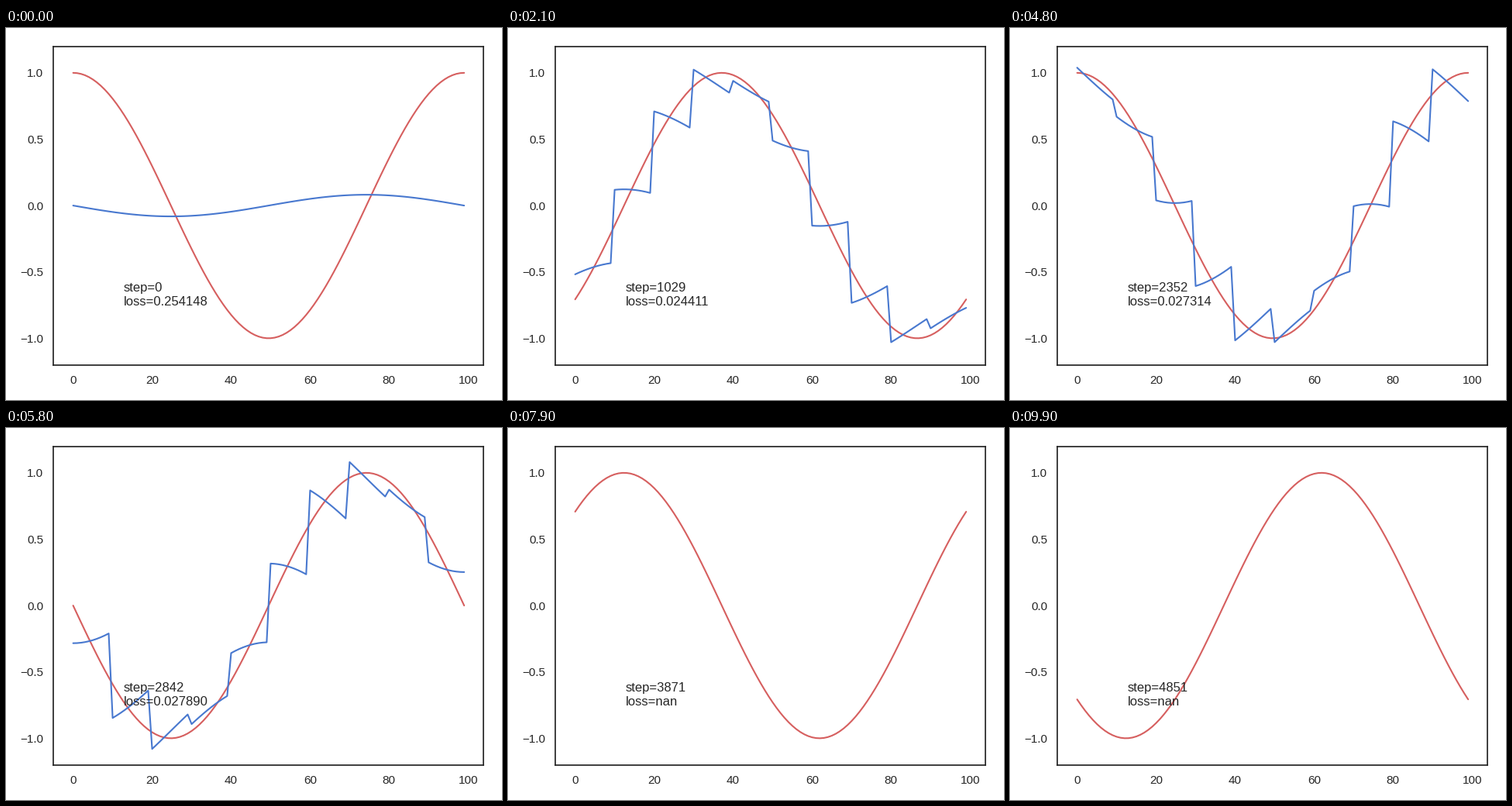
Animation of 640 by 480 pixels, one loop 10 s. Source, as a matplotlib script:

```python
import numpy as np
import matplotlib.pyplot as plt
from matplotlib.animation import FuncAnimation

INK, RED, BLUE = "#262626", "#D65F5F", "#4878CF"
FRAMES, STEP = 100, 49
NAN_FROM = 74  # training diverges here

plt.rcParams.update({
    "font.family": "Liberation Sans",
    "font.size": 12,
    "text.color": INK,
    "axes.edgecolor": INK,
    "axes.linewidth": 1.25,
    "lines.linewidth": 1.5,
    "lines.solid_capstyle": "round",
})

x = np.arange(100)
t = np.linspace(0, 2 * np.pi, 100)
t_start = t[x // 10 * 10]  # angle at the start of each ten-sample chunk


def prediction(i, phase):
    """Scaled input plus an offset that is held over each chunk."""
    w = -0.0816 - 0.4 * np.tanh(i / 32)
    gain = 1 - np.exp(-0.6 * i) * np.cos(0.7 * i)
    held = gain * 0.961 * np.exp(1j * np.radians(15.1)) * (1 + 1j * w)
    return w * np.sin(t + phase) + (held * np.exp(1j * (t_start + phase))).real


def loss(i):
    """Fast drop at first, then a slow climb."""
    return 0.0294 + 0.234578 * np.exp(-2 * i) - 0.00983 * np.exp(-0.0323 * i)


fig = plt.figure(figsize=(6.4, 4.8), dpi=100, facecolor="white")
ax = fig.add_axes([61.4 / 640, 45.4 / 480, 555 / 640, 411 / 480])
ax.set_xlim(-4.95, 103.95)
ax.set_ylim(-1.2, 1.2)
ax.set_xticks(np.arange(0, 101, 20))
ax.set_yticks(np.arange(-1, 1.1, 0.5))
ax.tick_params(length=6, pad=3.5, left=False, bottom=False,
               labelsize=11, labelcolor=INK)

truth, = ax.plot(x, np.cos(t), color=RED)
guess, = ax.plot(x, prediction(0, 0), color=BLUE)
label = ax.text(12.75, -0.75, "")


def update(i):
    phase = i * np.pi / 4
    alive = i < NAN_FROM
    truth.set_ydata(np.cos(t + phase))
    guess.set_ydata(prediction(i, phase) if alive else np.full(100, np.nan))
    value = f"{loss(i):.6f}" if alive else "nan"
    label.set_text(f"step={i * STEP}\nloss={value}")
    return truth, guess, label


anim = FuncAnimation(fig, update, frames=FRAMES, interval=100,
                     repeat=True, repeat_delay=0)
plt.show()
```
